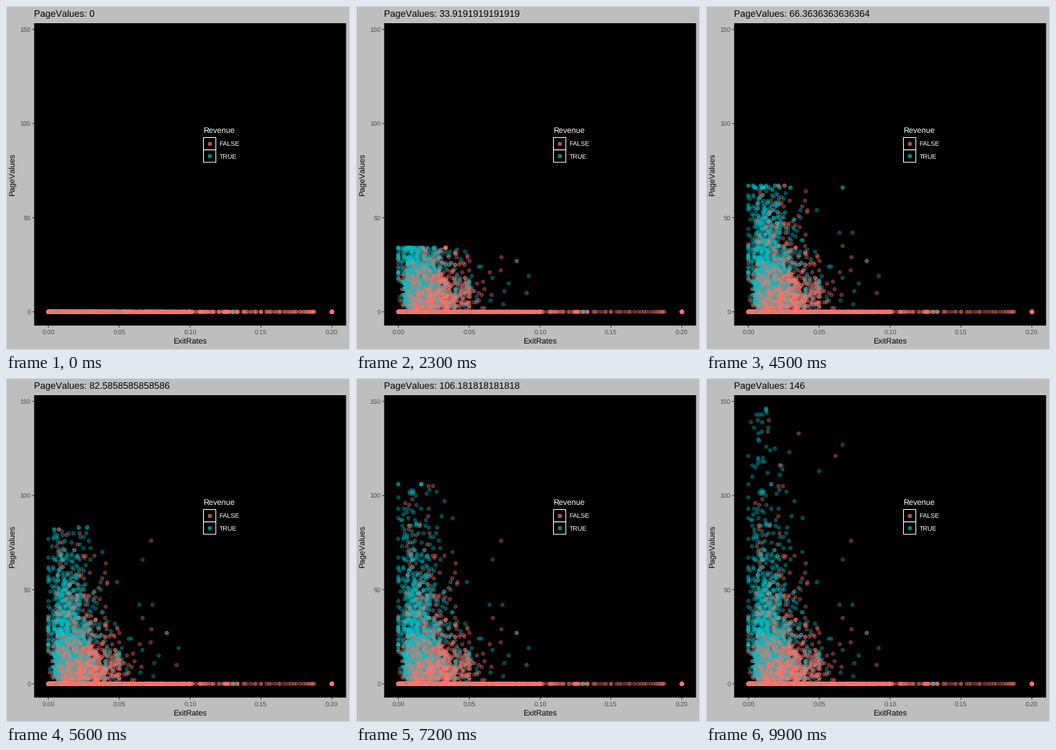
A matplotlib script for the animation above (10000 ms loop, 480 px wide and 480 px high).

```python
from math import gcd

import numpy as np
import matplotlib.pyplot as plt
from matplotlib.animation import FuncAnimation
from matplotlib.patches import Rectangle

plt.rcParams["font.family"] = "Liberation Sans"
plt.rcParams["text.hinting"] = "no_hinting"
plt.rcParams["text.hinting_factor"] = 1

SIZE, FRAMES = 480, 100
MAX_RATE, MAX_VALUE = 0.2, 146
LEFT, RIGHT, UPPER, LOWER = 39.3, 474.5, 24.0, 445.9
COLORS = np.array([[248, 118, 109], [0, 191, 196]]) / 255  # FALSE, TRUE
ALPHA, KEY_ALPHA = 0.36, 0.68
DOT = dict(s=4.97 ** 2, linewidths=0.9, edgecolors="face")

# Most visible lone points: (exit rate, page value)
LONE = [
    [(0.0615, 121), (0.0355, 133), (0.0725, 76), (0.0905, 10), (0.0835, 27)],
    [(0.0125, 146), (0.0155, 124), (0, 106), (0.0665, 127), (0.05, 113),
     (0.0665, 66), (0.0835, 27), (0.092, 19)],
]


def to_px(x, y):
    """Data values to stage pixels, with 5% padding around each range."""
    w, h = RIGHT - LEFT, LOWER - UPPER
    return (LEFT + w * (x / MAX_RATE + 0.05) / 1.1,
            LOWER - h * (y / MAX_VALUE + 0.05) / 1.1)


def cloud(rng, n, median, spread, shape, mean, at_zero):
    """Positive page values; exit rates narrow as the values rise."""
    y = np.maximum(np.rint(rng.lognormal(np.log(median), spread, n)), 1)
    x = rng.gamma(shape, mean / shape, n) / (1 + y / 300)
    snap = rng.random(n) < 0.14
    x[snap] = MAX_RATE / np.clip(np.rint(MAX_RATE / x[snap]), 4, 30)
    x[(rng.random(n) < at_zero) & (y > 16)] = 0
    keep = (y < MAX_VALUE) & (x < 0.042 + 0.022 * np.exp(-y / 20))
    return x[keep], y[keep]


def stragglers(rng, n):
    """Thin scatter to the right of the cloud."""
    y = np.rint(rng.exponential(22, n)) + 4
    x = rng.uniform(0.045, 0.078, n)
    return x[y < 66], y[y < 66]


def zero_row(rng):
    """Visits without value: dense at first, then simple fractions of 0.2."""
    dense = rng.exponential(0.028, 1500)
    tail = [MAX_RATE * k / n for n in range(1, 17) for k in range(n // 2, n + 1)
            if gcd(k, n) == 1 and 2 * k >= n
            for _ in range(max(1, 40 // n ** 2))]
    x = np.concatenate([dense[dense < 0.1], rng.uniform(0, 0.1, 420),
                        rng.uniform(0.1, 0.134, 24), np.zeros(12), tail])
    kind = (rng.random(len(x)) < 0.05) & (x < 0.07)
    return np.append(x, [0.131] * 2), np.append(kind, [True] * 2).astype(int)


def build():
    rng = np.random.default_rng(12)
    zx, zk = zero_row(rng)
    parts = [(zx, np.zeros(len(zx)), zk)]
    shapes = [(1300, 10.5, 0.9, 3.8, 0.023, 0.02),
              (1250, 23, 0.9, 2.7, 0.0175, 0.06)]
    for kind, args in enumerate(shapes):
        groups = (cloud(rng, *args), stragglers(rng, 18), np.array(LONE[kind]).T)
        for px, py in groups:
            parts.append((px, py, np.full(len(px), kind)))
    cols = [np.concatenate(c) for c in zip(*parts)]
    order = rng.permutation(len(cols[0]))
    return [c[order] for c in cols]


x, y, kind = build()
xy = np.column_stack(to_px(x, y))
rgba = np.column_stack([COLORS[kind], np.full(len(kind), ALPHA)])
reveal = np.rint(y * (FRAMES - 1) / MAX_VALUE).astype(int)

fig = plt.figure(figsize=(SIZE / 72, SIZE / 72), dpi=72, facecolor="#bebebe")
ax = fig.add_axes([0, 0, 1, 1])
ax.set(xlim=(0, SIZE), ylim=(SIZE, 0))
ax.axis("off")


def box(left, top, w, h, **kw):
    ax.add_patch(Rectangle((left, top), w, h, snap=False, **kw))


def label(px, py, text, size, color="black", **kw):
    kw = {"va": "baseline", **kw}
    return ax.text(px, py, text, fontsize=size, color=color, **kw)


def tick(xs, ys):
    ax.plot(xs, ys, color="#333333", lw=1.07, solid_capstyle="butt", snap=False)


box(0, 0, SIZE, SIZE, fill=False, ec="white", lw=1.07)
box(LEFT, UPPER, RIGHT - LEFT, LOWER - UPPER, fc="black", lw=0)

for i in range(5):
    px, _ = to_px(i * 0.05, 0)
    tick([px, px], [LOWER, LOWER + 2.75])
    label(px, 457.9, f"{i * 0.05:.2f}", 8.8, "#4d4d4d", ha="center")
for v in range(0, 151, 50):
    _, py = to_px(0, v)
    tick([LEFT - 2.75, LEFT], [py, py])
    label(34.4, py + 3.1, str(v), 8.8, "#4d4d4d", ha="right")

label((LEFT + RIGHT) / 2, 472, "ExitRates", 11, ha="center")
label(9.5, (UPPER + LOWER) / 2, "PageValues", 11, ha="center", va="center",
      rotation=90)
title = label(LEFT, 15, "", 13.2)

dots = ax.scatter([], [], zorder=3, **DOT)

label(275, 177, "Revenue", 11, "white", zorder=5)
for i, name in enumerate(("FALSE", "TRUE")):
    top = 183.5 + 17.28 * i
    box(275.5, top, 17.28, 17.28, fc="black", ec="white", lw=1.07, zorder=5)
    ax.scatter([284.1], [top + 8.64], color=[(*COLORS[i], KEY_ALPHA)], zorder=6,
               **DOT)
    label(297.6, top + 11.9, name, 8.8, "white", zorder=5)


def draw(frame):
    # Points reaching the current value are drawn a second time on top.
    idx = np.concatenate([np.flatnonzero(reveal <= frame),
                          np.flatnonzero(reveal == frame)])
    dots.set_offsets(xy[idx])
    dots.set_facecolors(rgba[idx])
    title.set_text(f"PageValues: {frame * MAX_VALUE / (FRAMES - 1):.15g}")
    return dots, title


anim = FuncAnimation(fig, draw, frames=FRAMES, interval=100, repeat=True,
                     repeat_delay=0, blit=False)
plt.show()
```
